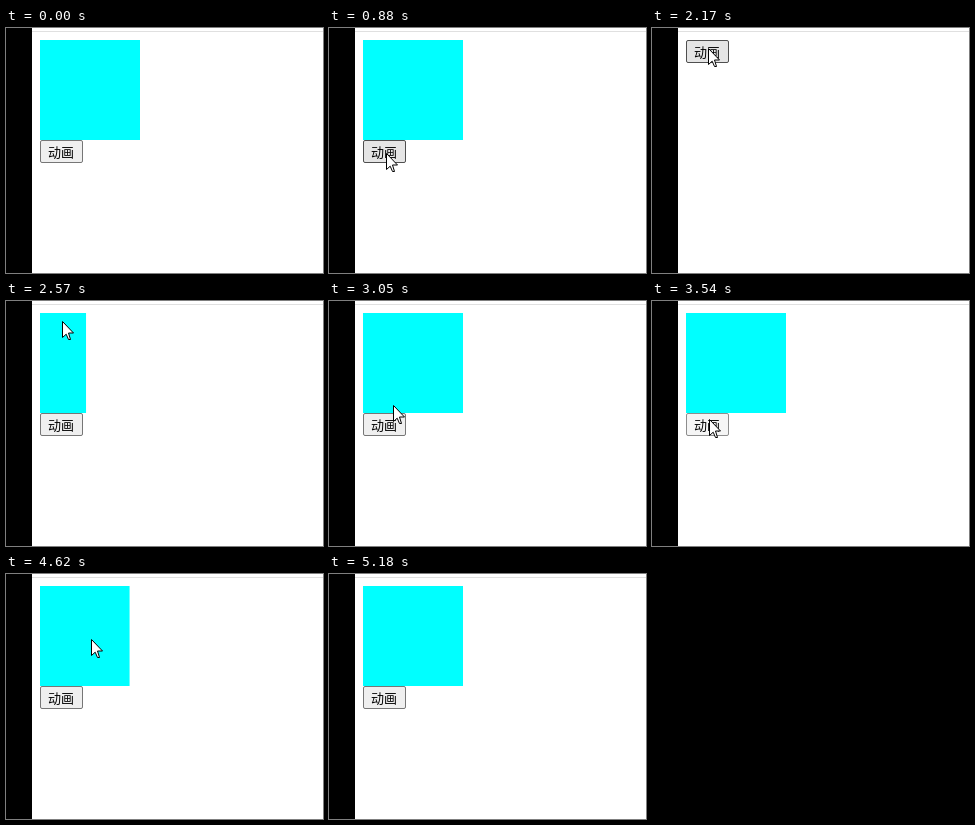
These frames come from a looping animation (317x245 px, 5.51 s). An HTML page:

```html
<!DOCTYPE html>
<html lang="zh-CN">
<head>
<meta charset="utf-8">
<title>动画</title>
<style>
  html, body { margin: 0; width: 100%; height: 100%; overflow: hidden; background: #fff; }
  svg { display: block; width: 100%; height: 100%; }
  text { font: 13px "Noto Sans CJK SC", "Noto Sans CJK", "Noto Sans CJK JP", sans-serif; text-anchor: middle; }
  #face { fill: #efefef; stroke: #767676; }
  #face.hover { fill: #e5e5e5; stroke: #4f4f4f; }
  #face.active { fill: #f5f5f5; stroke: #8d8d8d; }
</style>
</head>
<body>
<svg viewBox="0 0 317 245">
  <rect width="317" height="245" fill="#fff"/>
  <rect x="26" y="3" width="291" height="1" fill="#e0e0e0"/>
  <rect width="26" height="245"/>
  <rect id="box" x="34" y="12" height="100" fill="#0ff"/>
  <g id="button">
    <rect id="face" x=".5" y=".5" width="42" height="22" rx="1.5"/>
    <text x="21" y="17">动画</text>
  </g>
  <path id="cursor" d="M.5 .5V16.5L4.2 13.2L6.5 18.5H8.5L6.5 12H11.5Z" fill="#fff" stroke="#000"/>
</svg>
<script>
const LOOP = 5510, FIRST = 120, STEP = 68;   // the picture refreshes every STEP ms
const GROW = 300, HOLD = 140;                // box growth, mouse button held down
const [box, button, face, cursor] =
  ['box', 'button', 'face', 'cursor'].map(id => document.getElementById(id));

// Each release of the mouse toggles the box.
const releases = [1410, 2500, 3600, 4425];

// The pointer enters, visits the button for every click and leaves.
const entry = { x: 248, y: 228 };
const moves = [
  { start: FIRST, end: 800, x: 57, y: 125 },
  { start: 1690, end: 2160, x: 56, y: 20 },
  { start: 2570, end: 3040, x: 65, y: 103 },
  { start: 3040, end: 3180, x: 57, y: 118 },
  { start: 3650, end: 4200, x: 58, y: 22 },
  { start: 4425, end: 4608, x: 85, y: 65 },
  { start: 4608, end: 5150, x: 290, y: 250 }
];

const easeOut = p => 1 - (1 - Math.min(Math.max(p, 0), 1)) ** 2.4;

function pointerAt(t) {
  let { x, y } = entry;
  for (const move of moves) {
    const k = easeOut((t - move.start) / (move.end - move.start));
    x += (move.x - x) * k;
    y += (move.y - y) * k;
  }
  return [Math.round(x), Math.round(y)];
}

function render(time) {
  const t = FIRST + Math.floor((time - FIRST) / STEP) * STEP;

  const done = releases.filter(release => release <= t);
  const shown = done.length % 2 === 0;
  const growth = done.length ? easeOut((t - done.at(-1)) / GROW) : 1;
  box.setAttribute('width', shown ? 100 * growth : 0);

  const top = shown ? 112 : 12;
  button.setAttribute('transform', `translate(34 ${top})`);

  const [x, y] = pointerAt(t);
  cursor.setAttribute('transform', `translate(${x} ${y})`);
  cursor.setAttribute('visibility', t < FIRST ? 'hidden' : 'visible');

  const over = x >= 34 && x < 77 && y >= top && y < top + 23;
  const pressed = releases.some(release => t >= release - HOLD && t < release);
  face.setAttribute('class', pressed ? 'active' : over ? 'hover' : '');
}

const origin = performance.now();
function tick() {
  render((performance.now() - origin) % LOOP);
  requestAnimationFrame(tick);
}
tick();
</script>
</body>
</html>
```
